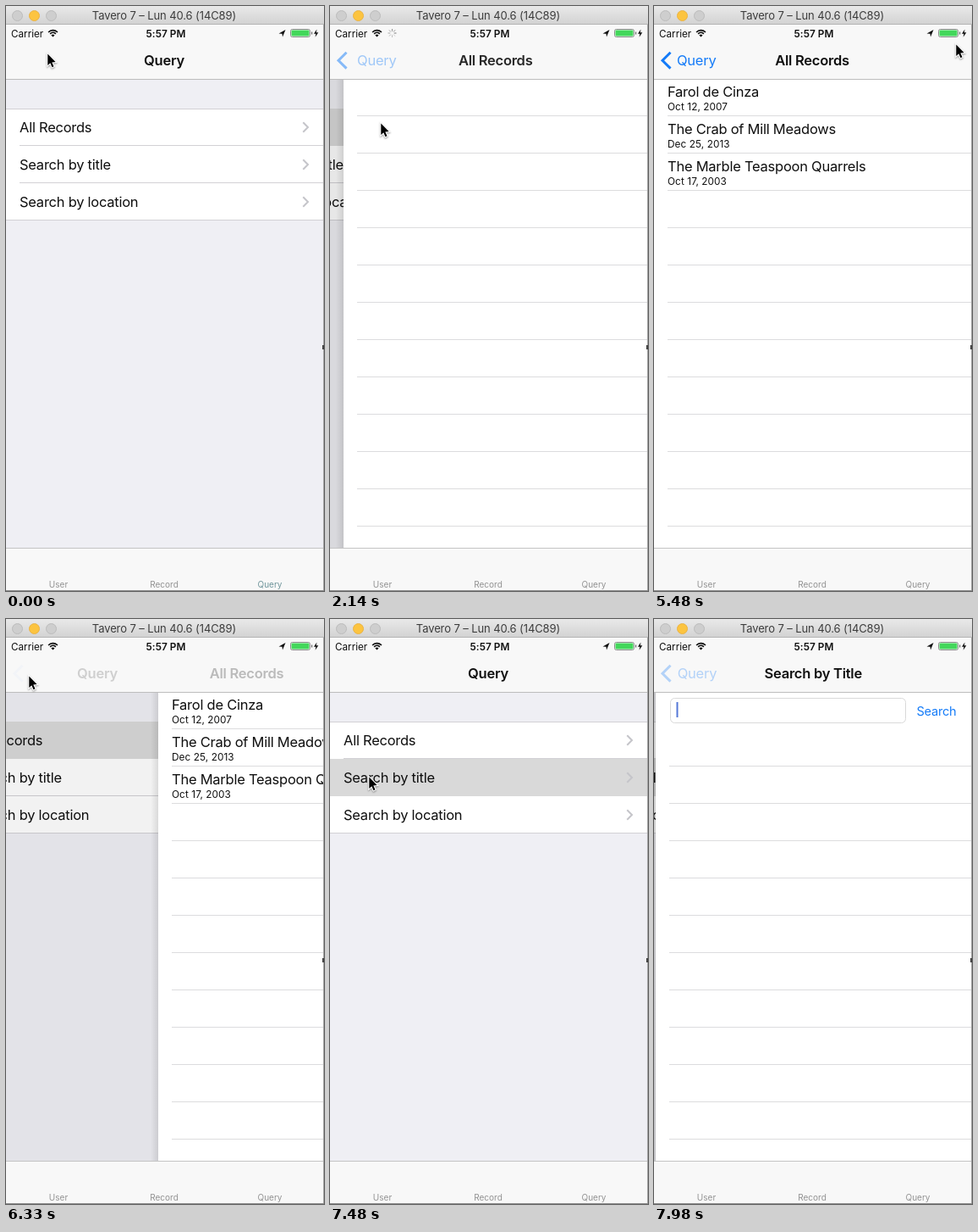
An HTML page with a canvas for the animation above (8 s loop, 376 by 690 pixels).

```html
<!DOCTYPE html>
<html lang="en">
<head>
<meta charset="utf-8">
<title>Records</title>
<style>
html, body { margin: 0; width: 376px; height: 690px; overflow: hidden; background: #fff; }
canvas { display: block; width: 376px; height: 690px; }
</style>
</head>
<body>
<canvas id="stage"></canvas>
<script>
const W = 376, H = 690, LOOP = 8000;
const LEFT = 16, ROW = 44, SCREEN = 375, TOP = 87, TAB_TOP = 639;
const BLUE = '#147bf8', INK = '#0f0f0f', LINE = '#d2d1d5', GREY = '#929292';
const PUSH_1 = 1870, POP = 6241.5, PUSH_2 = 7585;

const canvas = document.getElementById('stage');
const ctx = canvas.getContext('2d');
const ratio = window.devicePixelRatio || 1;
canvas.width = W * ratio;
canvas.height = H * ratio;

const records = [
  ['Farol de Cinza', 'Oct 12, 2007'],
  ['The Crab of Mill Meadows', 'Dec 25, 2013'],
  ['The Marble Teaspoon Quarrels', 'Oct 17, 2003']
];
const menu = ['All Records', 'Search by title', 'Search by location'];

const clamp = v => Math.max(0, Math.min(1, v));
const smooth = v => { v = clamp(v); return v * v * (3 - 2 * v); };
const mix = (a, b, k) => a + (b - a) * k;

// Critically damped spring: 1 at the start, falling to 0.
function spring(ms) {
  const u = Math.max(0, ms) / 1000 * 18.26;
  return (1 + u) * Math.exp(-u);
}

function rect(x, y, w, h, color) {
  ctx.fillStyle = color;
  ctx.fillRect(x, y, w, h);
}

function text(str, x, y, { size = 16.5, weight = 400, color = INK, align = 'left', space = -0.25, alpha = 1 } = {}) {
  if (alpha <= 0) return;
  ctx.save();
  ctx.globalAlpha *= alpha;
  ctx.font = `${weight} ${size}px Inter, "Liberation Sans", sans-serif`;
  ctx.letterSpacing = space + 'px';
  ctx.textAlign = align;
  ctx.fillStyle = color;
  ctx.fillText(str, x, y);
  ctx.restore();
}

function poly(points, { fill, stroke, width = 1, close = false }) {
  ctx.beginPath();
  points.forEach(([x, y], i) => i ? ctx.lineTo(x, y) : ctx.moveTo(x, y));
  if (close) ctx.closePath();
  if (stroke) { ctx.strokeStyle = stroke; ctx.lineWidth = width; ctx.stroke(); }
  if (fill) { ctx.fillStyle = fill; ctx.fill(); }
}

function box(x, y, w, h, r, fill, stroke) {
  ctx.beginPath();
  ctx.roundRect(x, y, w, h, r);
  if (fill) { ctx.fillStyle = fill; ctx.fill(); }
  if (stroke) { ctx.strokeStyle = stroke; ctx.lineWidth = 1; ctx.stroke(); }
}

function windowBar() {
  const g = ctx.createLinearGradient(0, 0, 0, 21);
  g.addColorStop(0, '#e9e9e9');
  g.addColorStop(1, '#d3d3d3');
  rect(0, 0, W, 21, g);
  rect(0, 21, W, 1, '#b4b4b4');
  [['#cecece', '#bcbcbc'], ['#fcc440', '#eab344'], ['#cecece', '#bcbcbc']].forEach(([fill, edge], i) =>
    box(7.5 + 20 * i, 5.5, 12, 12, 6, fill, edge));
  text('Tavero 7 – Lun 40.6 (14C89)', 187, 16, { size: 13, color: '#3c3c3c', align: 'center', space: -0.1 });
}

function wifi() {
  ctx.strokeStyle = INK;
  ctx.lineWidth = 1.6;
  [4.6, 7.4].forEach(r => {
    ctx.beginPath();
    ctx.arc(55.5, 36, r, -Math.PI * 0.76, -Math.PI * 0.24);
    ctx.stroke();
  });
  ctx.beginPath();
  ctx.moveTo(55.5, 36.5);
  ctx.arc(55.5, 36.5, 2.9, -Math.PI * 0.76, -Math.PI * 0.24);
  ctx.fillStyle = INK;
  ctx.fill();
}

function spinner(t) {
  ctx.lineWidth = 1;
  for (let i = 0; i < 8; i++) {
    const a = i * Math.PI / 4;
    const age = (i - Math.floor(t / 125) % 8 + 8) % 8;
    ctx.strokeStyle = `rgba(90,90,90,${0.3 + age * 0.07})`;
    ctx.beginPath();
    ctx.moveTo(73.5 + 2.2 * Math.cos(a), 32 + 2.2 * Math.sin(a));
    ctx.lineTo(73.5 + 5 * Math.cos(a), 32 + 5 * Math.sin(a));
    ctx.stroke();
  }
}

function statusBar(t) {
  text('Carrier', 6, 36.5, { size: 11.7, space: 0 });
  wifi();
  if (t >= 1940 && t < 3090) spinner(t);
  text('5:57 PM', 189, 36.5, { size: 11.8, weight: 600, align: 'center', space: 0.05 });
  poly([[330.5, 28], [322.5, 32.5], [326.5, 32.8], [327, 36.5]], { fill: INK, close: true });
  box(336.5, 27.5, 23, 9, 2, null, '#8d8d8d');
  box(337.5, 28.5, 21, 7, 1, '#43d75b');
  rect(361, 30.5, 1.2, 3, '#666');
  poly([[367.5, 27.5], [364, 32.8], [366.4, 32.8], [365.6, 36.8], [369.3, 31.2], [366.8, 31.2]], { fill: INK, close: true });
}

function navBar(t, view) {
  rect(0, 22, SCREEN, 64, '#f8f8f8');
  rect(0, 86, SCREEN, 1, '#bdbdbd');
  statusBar(t);

  const { p, dt, popping, name } = view;
  let home = 1, title = 0, back = 0, arrow = 0;
  if (name && popping) {
    home = clamp(dt / 500);
    title = clamp(1 - dt / 120);
    back = 0.25 * clamp(1 - dt / 80);
    arrow = 0.25 * clamp(1 - dt / 100);
  } else if (name) {
    const press = t >= 6140 ? 0.3 : 1;
    home = clamp(1 - dt / 150);
    title = clamp(dt / 300);
    back = clamp((dt - 200) / 180) * press;
    arrow = clamp((dt - 170) / 200) * press;
  }
  const bold = { weight: 600, align: 'center' };
  text('Query', 187 - 152 * (1 - p), 70, { ...bold, alpha: home });
  if (!name) return;
  text(name, 187 + 203 * p, 70, { ...bold, alpha: title });
  text('Query', 27 + 118 * p, 70, { color: BLUE, alpha: back });
  ctx.globalAlpha = arrow;
  poly([[19.5, 54.8], [10, 64.2], [19.5, 73.6]], { stroke: BLUE, width: 3 });
  ctx.globalAlpha = 1;
}

function menuPage(t) {
  rect(0, TOP, SCREEN, TAB_TOP - TOP, '#efeff4');
  rect(0, 121, SCREEN, 132, '#fff');
  rect(0, 121, SCREEN, 1, LINE);
  rect(0, 252, SCREEN, 1, LINE);
  rect(LEFT, 164, SCREEN - LEFT, 1, LINE);
  rect(LEFT, 208, SCREEN - LEFT, 1, LINE);
  const glow = [
    t >= 1840 ? 1 - smooth((t - 6330) / 470) : 0,
    t >= 7480 ? 1 : 0
  ];
  menu.forEach((label, i) => {
    const y = 121 + ROW * i;
    if (glow[i]) rect(0, y, SCREEN, ROW, `rgba(217,217,217,${glow[i]})`);
    text(label, LEFT, y + 28);
    poly([[351.3, y + 16.3], [357, y + 22], [351.3, y + 27.7]], { stroke: '#c5c5ca', width: 2 });
  });
}

function lines(from) {
  rect(0, TOP, SCREEN, TAB_TOP - TOP, '#fff');
  for (let y = from; y < TAB_TOP; y += ROW) rect(LEFT, y, SCREEN, 1, '#dcdcde');
}

function recordsPage(t) {
  lines(129);
  if (t < 3090) return;
  records.forEach(([name, date], i) => {
    text(name, LEFT, 107 + ROW * i);
    text(date, LEFT, 123 + ROW * i, { size: 11.8, space: 0.08 });
  });
}

function searchPage() {
  lines(173);
  box(17.5, 93.5, 278, 29, 5, '#fff', '#d9d9d9');
  rect(24.5, 98, 2, 18, '#5578d8');
  text('Search', 308.5, 113.5, { size: 14.6, color: BLUE });
}

function pages(t, view) {
  const { p, name } = view;
  const height = TAB_TOP - TOP;
  ctx.save();
  ctx.beginPath();
  ctx.rect(0, TOP, SCREEN, height);
  ctx.clip();
  if (!name || p > 0) {
    ctx.save();
    if (name) ctx.translate(Math.round(-112.5 * (1 - p)), 0);
    menuPage(t);
    ctx.restore();
  }
  if (name) {
    const x = Math.round(SCREEN * p);
    if (p > 0) {
      rect(0, TOP, SCREEN, height, `rgba(0,0,0,${0.1 * (1 - p)})`);
      const g = ctx.createLinearGradient(x - 9, 0, x, 0);
      g.addColorStop(0, 'rgba(0,0,0,0)');
      g.addColorStop(1, 'rgba(0,0,0,0.1)');
      rect(x - 9, TOP, 9, height, g);
    }
    ctx.translate(x, 0);
    view.draw(t);
  }
  ctx.restore();
}

function tabBar(t) {
  rect(0, TAB_TOP, SCREEN, 50, '#f8f8f8');
  rect(0, TAB_TOP, SCREEN, 1, '#c4c4c4');
  ['User', 'Record', 'Query'].forEach((label, i) =>
    text(label, 62 + 125 * i, 685.5, {
      size: 10, space: 0, align: 'center',
      color: i === 2 && t < 2090 ? '#6f959b' : GREY
    }));
}

function pointerAt(t) {
  if (t < 3090) {
    const k = smooth((t - 1090) / 550);
    return [mix(49, 60, k), mix(56, 138, k)];
  }
  if (t < 3440) {
    const k = Math.pow((t - 3040) / 400, 1.3), m = 1 - k;
    const curve = (a, b, c) => m * m * a + 2 * m * k * b + k * k * c;
    return [curve(60, 236, 380), curve(138, 39, 40)];
  }
  if (t < 5480) return null;
  if (t < 6380) {
    const k = smooth((t - 5480) / 560);
    return [mix(357, 27, k), mix(45, 67, k)];
  }
  if (t < 7780) {
    const k = smooth((t - 6380) / 800);
    return [mix(27, 46, k), mix(67, 186, k)];
  }
  return null;
}

function pointer(t) {
  const at = pointerAt(t);
  if (!at) return;
  ctx.save();
  ctx.translate(at[0], at[1]);
  const shape = [[0.3, 0.6], [0.3, 14], [3.3, 11.2], [5.5, 16.2], [7.5, 15.3], [5.3, 10.4], [9.6, 10.1]];
  ctx.shadowColor = 'rgba(0,0,0,0.4)';
  ctx.shadowBlur = 2 * ratio;
  ctx.shadowOffsetY = ratio;
  poly(shape, { stroke: '#fff', width: 2.2, close: true });
  ctx.shadowColor = 'transparent';
  poly(shape, { fill: '#000', close: true });
  ctx.restore();
}

function viewAt(t) {
  const home = { p: 1, dt: 0, name: null };
  if (t < PUSH_1) return home;
  let view;
  if (t < POP) {
    view = { p: spring(t - PUSH_1), dt: t - PUSH_1, name: 'All Records', draw: recordsPage };
  } else if (t < PUSH_2) {
    view = { p: 1 - spring(t - POP), dt: t - POP, popping: true, name: 'All Records', draw: recordsPage };
    if (view.p > 0.999) return home;
  } else {
    view = { p: spring(t - PUSH_2), dt: t - PUSH_2, name: 'Search by Title', draw: searchPage };
  }
  if (view.p < 0.001) view.p = 0;
  return view;
}

function draw(t) {
  ctx.setTransform(ratio, 0, 0, ratio, 0, 0);
  rect(0, 0, W, H, '#fff');
  const view = viewAt(t);
  pages(t, view);
  navBar(t, view);
  tabBar(t);
  windowBar();
  rect(SCREEN, 22, 1, H - 22, '#a6a6a6');
  rect(0, H - 1, W, 1, '#8c8c8c');
  rect(SCREEN - 1, 400, 2, 5, '#444');
  pointer(t);
}

// The picture advances in 50 ms steps, with a little slack for timer rounding.
function step(t) {
  const shift = t < 4000 ? 40 : 30;
  return Math.max(0, Math.floor((t - shift + 3) / 50) * 50 + shift);
}

const start = performance.now();
function tick() {
  const now = Math.max(0, performance.now() - start);
  draw(step(now % LOOP));
  requestAnimationFrame(tick);
}
tick();
</script>
</body>
</html>
```
